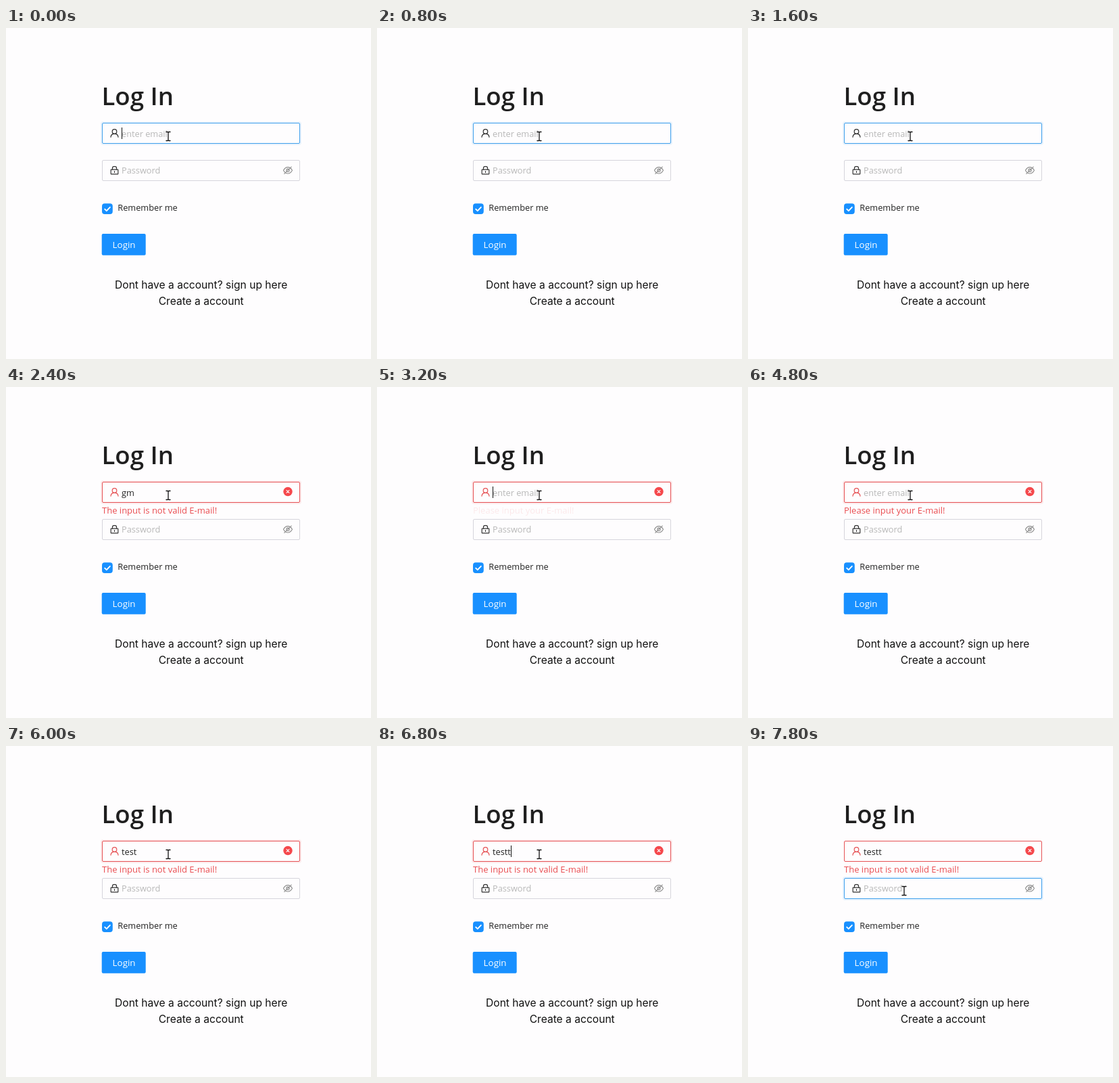
Animation, 540 px wide and 489 px high, one loop 8000 ms. Source, as an HTML page:

```html
<!DOCTYPE html>
<html lang="en">
<head>
<meta charset="utf-8">
<title>Log In</title>
<style>
  html, body { margin: 0; width: 100%; height: 100%; overflow: hidden; background: #fefdfe; }
  svg { display: block; width: 540px; height: 489px; }
  text { font: 12.75px "Open Sans", "Noto Sans", sans-serif; fill: #222; white-space: pre; }
  .title { font-size: 36.6px; font-weight: 600; fill: #1f1f1f; }
  .hint { fill: #b8b8b8; }
  .button { font-size: 13.4px; fill: #fff; }
  .error { font-size: 13px; fill: #ea4c50; }
  .link { font: 15.6px Inter, sans-serif; fill: #111; text-anchor: middle; }
  .line { fill: none; stroke-linecap: round; stroke-linejoin: round; }
</style>
</head>
<body>
<svg viewBox="0 0 540 489">
  <text class="title" x="141.5" y="114">Log In</text>

  <rect id="emailGlow" x="141" y="139" width="295" height="33" rx="3" fill="none" stroke-width="2"/>
  <rect id="emailBox" x="142.5" y="140.5" width="292" height="30" rx="1.5" fill="#fefdfe"/>
  <g id="userIcon" class="line" stroke-width="1.2">
    <circle cx="160.5" cy="153" r="3.3"/>
    <path d="M155 161.2C155.2 158 157.5 156.4 160.5 156.4S165.8 158 166 161.2"/>
  </g>
  <text id="emailHint" class="hint" x="171" y="160.5">enter email</text>
  <text id="email" x="171" y="160.5"></text>
  <g id="errorIcon">
    <circle cx="417" cy="154.5" r="6.7" fill="#f5484c"/>
    <path class="line" stroke="#fff" stroke-width="1.2" d="M415.1 152.6l3.8 3.8m0-3.8l-3.8 3.8"/>
  </g>
  <text id="error" class="error" x="142" y="187"></text>

  <rect id="passGlow" x="141" y="194" width="295" height="33" rx="3" fill="none" stroke="#1890ff" stroke-width="2"/>
  <rect id="passBox" x="142.5" y="195.5" width="292" height="30" rx="1.5" fill="#fefdfe"/>
  <g class="line" stroke="#333" stroke-width="1.2">
    <rect x="155.2" y="209.2" width="10.6" height="6.6" rx=".6"/>
    <path d="M157.5 209v-2.2q0-2.2 2.2-2.2h1.6q2.2 0 2.2 2.2V209M160.5 211.6v1.8"/>
  </g>
  <text class="hint" x="171" y="215">Password</text>
  <g class="line" stroke="#8c8c8c" stroke-width="1.1">
    <path d="M410.5 210.3Q413 205.6 417 205.6T423.5 210.3Q421 215 417 215T410.5 210.3ZM411.8 215.4l10.4-10.2"/>
    <circle cx="417" cy="210.3" r="2.2"/>
  </g>

  <rect x="142" y="259.3" width="15.8" height="15.7" rx="4" fill="#1890ff"/>
  <path class="line" stroke="#fff" stroke-width="1.9" d="M146.2 267.6l2.6 2.6 5-5.4"/>
  <text x="165.3" y="270">Remember me</text>

  <rect x="141.7" y="304" width="65" height="31.7" rx="2" fill="#1890ff"/>
  <text class="button" x="157.6" y="325">Login</text>

  <text class="link" x="288.7" y="384.5">Dont have a account? sign up here</text>
  <text class="link" x="288.7" y="409">Create a account</text>

  <rect id="caret" width="1" height="17" fill="#111"/>
  <path id="pointer" class="line" stroke="#111" stroke-width="1.3"
        d="M-3-6.5h2q1 0 1 1 0-1 1-1h2M0-5.5v11M-3 6.5h2q1 0 1-1 0 1 1 1h2"/>
</svg>
<script>
  const LOOP = 8000, BLINK = 530, CLICK = 7150, GLOW = 0.1;
  const INVALID = 'The input is not valid E-mail!';
  const MISSING = 'Please input your E-mail!';

  // [time, value]
  const typed = [
    [-200, ''], [1700, 'g'], [1850, 'gm'], [3000, 'g'], [3150, ''],
    [5000, 't'], [5150, 'te'], [5280, 'tes'], [5420, 'test'], [6550, 'testt']
  ];
  const errors = [[-200, ''], [1700, INVALID], [3150, MISSING], [5000, INVALID]];

  const el = {};
  document.querySelectorAll('[id]').forEach(node => el[node.id] = node);

  const set = (node, attrs) => {
    for (const name in attrs) node.setAttribute(name, attrs[name]);
  };
  const stepAt = (steps, t) => steps.filter(step => step[0] <= t).pop();
  const ease = (t, start, length) => {
    const p = Math.min(1, Math.max(0, (t - start) / length));
    return p * p * (3 - 2 * p);
  };
  const mix = (a, b, p) => a + (b - a) * p;
  const blend = (a, b, p) => `rgb(${a.map((v, i) => Math.round(mix(v, b[i], p)))})`;

  const BLUE = [64, 160, 236], RED = [230, 82, 85], GREY = [214, 213, 220], DARK = [45, 45, 45];

  function render(t) {
    const [keyTime, value] = stepAt(typed, t);
    const [errorTime, message] = stepAt(errors, t);
    const invalid = ease(t, errors[1][0], 250);
    const moved = ease(t, CLICK, 250);

    el.email.textContent = value;
    el.emailHint.style.display = value ? 'none' : '';
    el.error.textContent = message;
    el.error.style.opacity = ease(t, errorTime, 250);

    const border = blend(BLUE, RED, invalid);
    set(el.emailBox, { stroke: border });
    set(el.emailGlow, { stroke: border, opacity: GLOW * (1 - moved) });
    set(el.userIcon, { stroke: blend(DARK, RED, invalid) });
    set(el.errorIcon, { opacity: invalid });
    set(el.passBox, { stroke: blend(GREY, BLUE, moved) });
    set(el.passGlow, { opacity: GLOW * moved });

    const inPassword = t >= CLICK;
    const since = t - (inPassword ? CLICK : keyTime);
    const width = inPassword || !value ? 0 : el.email.getComputedTextLength();
    set(el.caret, {
      x: 171 + Math.round(width),
      y: inPassword ? 202 : 147,
      opacity: since % (2 * BLINK) < BLINK ? 1 : 0
    });

    const p = ease(t, 6800, 300);
    set(el.pointer, { transform: `translate(${mix(240, 231, p)} ${mix(160, 214, p)})` });
  }

  const begin = performance.now();
  function tick() {
    render((performance.now() - begin) % LOOP);
    requestAnimationFrame(tick);
  }
  tick();
</script>
</body>
</html>
```
